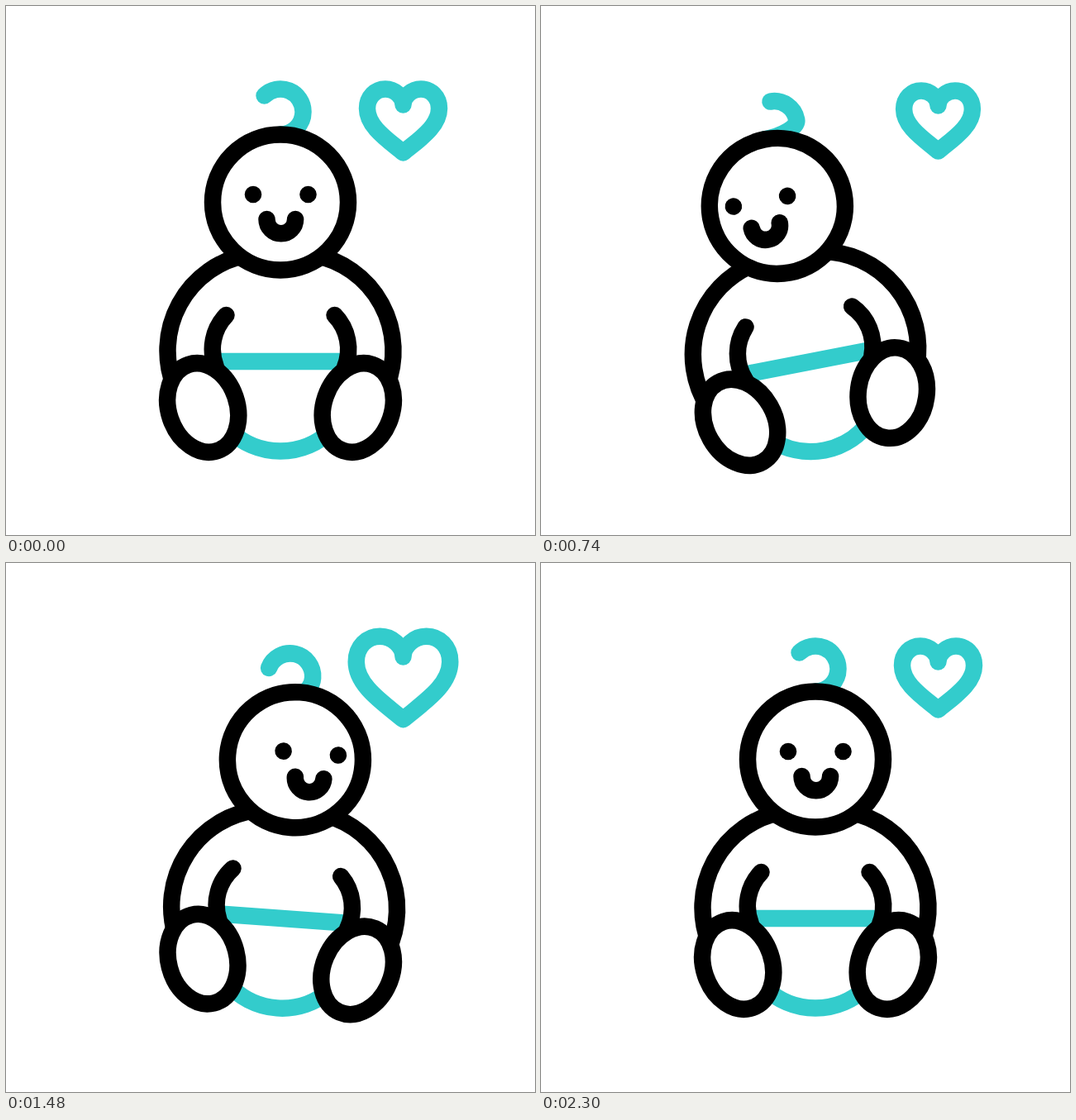
Recreate the animation shown at these times as an HTML page. Size 640 by 640 pixels, loop 2.4 s.

```html
<!DOCTYPE html>
<html lang="en">
<head>
<meta charset="utf-8">
<title>Rocking baby</title>
<style>
  html, body { margin: 0; width: 100%; height: 100%; overflow: hidden; background: #fff; }
  svg { display: block; width: 100%; height: 100%; }
  .line { fill: none; stroke: #000; stroke-width: 20.5; stroke-linecap: round; stroke-linejoin: round; }
  .teal { stroke: #3cc; }
  .solid { fill: #fff; }
</style>
</head>
<body>
<svg viewBox="0 0 640 640">
  <path id="heart" class="line teal" vector-effect="non-scaling-stroke"
    d="M0 -19.5C0 -29 -10 -38.5 -21.5 -38.5C-33.5 -38.5 -43.5 -29 -43.5 -15C-43.5 7 -18.5 23 0 38.5C18.5 23 43.5 7 43.5 -15C43.5 -29 33.5 -38.5 21.5 -38.5C10 -38.5 0 -29 0 -19.5"/>
  <g id="baby" class="line">
    <path id="hair" class="teal" transform="translate(332 155.5)"/>
    <path class="teal" stroke-linecap="butt" d="M258 430H406M270 513A88 88 0 0 0 394 513"/>
    <g id="side">
      <path d="M290 301.4A118 118 0 0 0 203.6 460M266.5 374A59 59 0 0 0 254 437"/>
      <ellipse class="solid" rx="41.4" ry="55" transform="translate(238.2 486) rotate(-18.8)"/>
    </g>
    <use href="#side" transform="translate(664) scale(-1 1)"/>
    <circle class="solid" cx="332" cy="237.5" r="82"/>
    <g id="face">
      <path d="M315.5 258a17.3 17.3 0 0 0 34.6 0"/>
      <g fill="#000" stroke="none">
        <circle cx="299" cy="228" r="10.3"/>
        <circle cx="365.5" cy="228" r="10.3"/>
      </g>
    </g>
  </g>
</svg>
<script>
const LOOP = 2400;
const SWING = [0, 645, 1270, 1810, 2300];
const PULSE = [392, 650, 908, 1166, 1424, 1682, 1940];
const part = id => document.getElementById(id);
const [heart, baby, hair, face] = ["heart", "baby", "hair", "face"].map(part);

// Eased value between key times, held outside them
function track(t, times, values) {
  if (t <= times[0]) return values[0];
  const i = times.findIndex(time => t < time);
  if (i < 0) return values[values.length - 1];
  const u = (t - times[i - 1]) / (times[i] - times[i - 1]);
  return values[i - 1] + (values[i] - values[i - 1]) * u * u * (3 - 2 * u);
}

// A round curl whose tail stays rooted at the top of the head
function hairPath(look) {
  const [slide, sink, curl] = look < 0 ? [-0.8, -0.59, -2.4] : [-0.757, 0.5, -1.56];
  const r = 27.5;
  const x = slide * look, y = sink * look - r;
  const angle = (curl * look - 45) * Math.PI / 180;
  const tip = [x + r * Math.sin(angle), y - r * Math.cos(angle)];
  return `M${tip}A${r} ${r} 0 0 1 ${x + r} ${y}A${x + r} ${-y} 0 0 1 0 0`;
}

function draw(now) {
  const t = now % LOOP;
  const tilt = track(t, SWING, [0, -12.3, 8.6, -4.3, 0]);
  const look = track(t, SWING, [0, -22.3, 27.2, 0, 0]);
  const scale = track(t, PULSE, [1, 0.78, 1.38, 0.78, 1.38, 0.78, 1]);

  baby.setAttribute("transform", `rotate(${tilt} 332 480)`);
  face.setAttribute("transform", `translate(${look})`);
  hair.setAttribute("d", hairPath(look));
  heart.setAttribute("transform", `translate(480.5 139) scale(${scale})`);
}

const start = performance.now();
function tick() {
  draw(performance.now() - start);
  requestAnimationFrame(tick);
}
tick();
</script>
</body>
</html>
```
